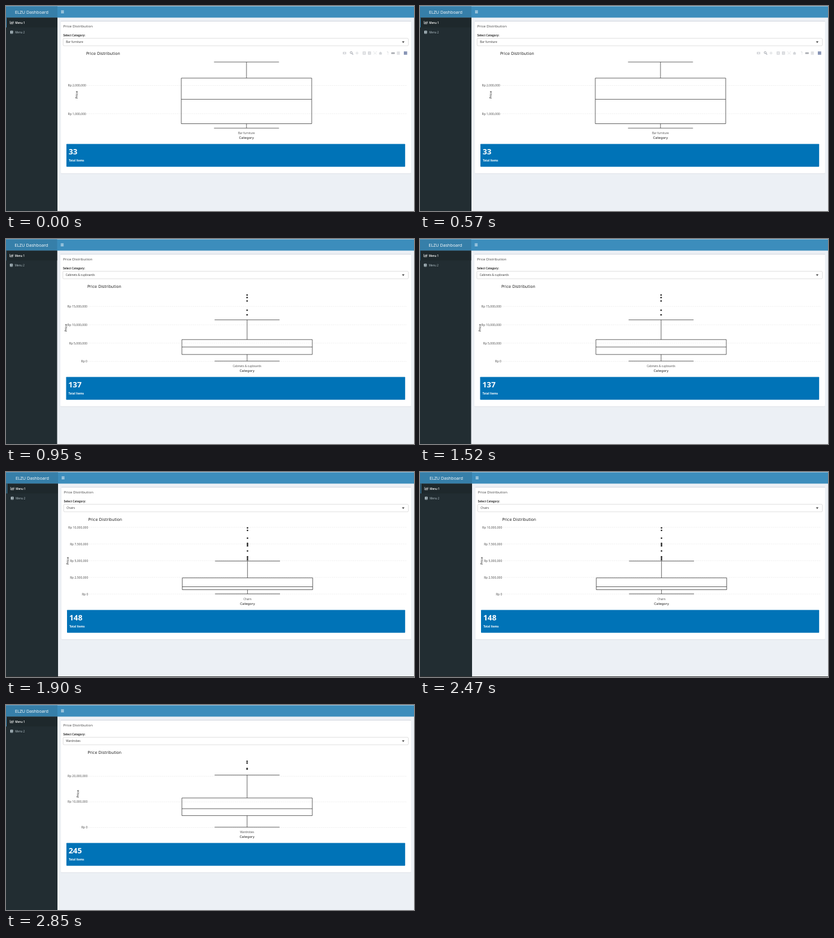
Animation of 682x344 px, one loop 3800 ms. Source, as an HTML page:

```html
<!DOCTYPE html>
<html lang="en">
<head>
<meta charset="utf-8">
<title>Dashboard</title>
<style>
  html, body { margin: 0; width: 100%; height: 100%; overflow: hidden; background: #ecf0f5; }
  svg { display: block; font-family: "Open Sans", "Noto Sans", sans-serif; }
  .plot { font-family: "DejaVu Sans", sans-serif; fill: #222; }
</style>
</head>
<body>
<svg id="stage" width="682" height="344" viewBox="0 0 682 344"></svg>
<script>
const HOLD = 950;

// dx: shell offset; ticks: [label, y]; box: [upper, q3, median, q1, lower]
const scenes = [
  { name: "Bar furniture", total: 33, dx: 0, titleX: 134, priceX: 119.5, cx: 402, tools: true,
    ticks: [["2,000,000", 133.5], ["1,000,000", 180.7]],
    box: [94, 121, 156.6, 197.5, 205], dots: [] },
  { name: "Cabinets & cupboards", total: 137, dx: -.5, titleX: 136, priceX: 102, cx: 403,
    ticks: [["15,000,000", 113.2], ["10,000,000", 144], ["5,000,000", 174.7], ["0", 205.4]],
    box: [135.7, 168.8, 181.2, 193.8, 204.9], dots: [94, 98.3, 104, 119.5, 127.3] },
  { name: "Chairs", total: 148, dx: 1, titleX: 137.4, priceX: 105.3, cx: 403.7, footer: true,
    ticks: [["10,000,000", 92.8], ["7,500,000", 120.8], ["5,000,000", 148.8], ["2,500,000", 176.8], ["0", 204.8]],
    box: [149.4, 177.7, 192.5, 197.5, 204.6],
    dots: [93.7, 98, 111, 119.7, 121.8, 124, 132.5, 142.4, 144.8, 147.2] },
  { name: "Wardrobes", total: 245, dx: 0, titleX: 136.4, priceX: 122, cx: 403,
    ticks: [["20,000,000", 119.5], ["10,000,000", 162.6], ["0", 205.6]],
    box: [117.6, 156, 174, 185.6, 205], dots: [94.5, 97.5, 106.6, 107.6] }
];

const rect = (x, y, w, h, fill, extra = "") =>
  `<rect x="${x}" y="${y}" width="${w}" height="${h}" fill="${fill}" ${extra}/>`;
const path = (d, stroke, width, extra = "") =>
  `<path d="${d}" fill="none" stroke="${stroke}" stroke-width="${width}" ${extra}/>`;
const text = (s, x, y, size, fill, extra = "") =>
  `<text x="${x}" y="${y}" font-size="${size}" fill="${fill}" ${extra}>${String(s).replace("&", "&amp;")}</text>`;
const BOLD = 'font-weight="700"', SEMI = 'font-weight="600"';
const MID = 'text-anchor="middle"', END = 'text-anchor="end"';

function shell({ dx, footer }) {
  const side = 86 + dx;
  return rect(0, 0, 682, 344, "#ecf0f5")
    + rect(0, .5, 682, 19, "#3c8dbc")
    + rect(0, 19.5, side, 325, "#222d32")
    + rect(0, .5, side, 19, "#367fa9")
    + rect(0, 19.5, side, 16.5, "#1e282c")
    + (footer ? rect(0, 343, 682, 1, "#333") : "")
    + `<g transform="translate(${dx})">`
    + rect(0, 19.5, 1, 16.5, "#3c8dbc")
    + text("ELZU Dashboard", 43, 12.6, 7.2, "#fff", MID)
    + path("M92 8h4.8m-4.8 1.8h4.8m-4.8 1.8h4.8", "#fff", .8)
    + path("M6.9 25.2v4.7h5.3M8.5 29v-1.8m1.3 1.8v-3m1.3 3v-2.3m1.1 2.3v-3.4", "#fff", .65)
    + text("Menu 1", 15.2, 29.6, 4.6, "#fff", SEMI)
    + rect(7.1, 41.5, 4.7, 5, "#b8c7ce", 'rx=".7"')
    + path("M8.6 42.8h2.3m-2.3 1h2.3M8 45.5h3.6", "#222d32", .45)
    + text("Menu 2", 15.2, 46, 4.6, "#b8c7ce")
    + "</g>";
}

function card({ dx, name, total }) {
  const left = 91.5 + dx;
  return rect(left, 25.6, 677 - left, 256, "#d9dde2", 'rx="1.5"')
    + rect(left, 25.5, 677 - left, 255.3, "#fff", 'rx="1.5"')
    + rect(left, 25, 677 - left, 1, "#d2d6de", 'rx=".5"')
    + text("Price Distribution", 95.7 + dx, 35.8, 6.1, "#444")
    + text("Select Category:", 95.7 + dx, 50.5, 4.6, "#333", BOLD)
    + rect(95.5 + dx, 54.2, 577 - dx, 12.6, "#fff", 'rx="1.5" stroke="#ccc" stroke-width=".6"')
    + text(name, 100.3 + dx, 62.4, 4.75, "#333")
    + '<path d="M661.8 59.4h4.4l-2.2 2.4z" fill="#222"/>'
    + rect(101 + dx, 231.6, 566.2 - dx, 38.1, "#0073b7", 'rx=".7"')
    + text(total, 104.7 + dx, 248.5, 12.9, "#fff", BOLD)
    + text("Total Items", 104.9 + dx, 260.9, 4.6, "#fff", BOLD);
}

function modebar() {
  const gray = "#d4d6da";
  return rect(563, 77, 5.6, 4, gray, 'rx=".6"') + `<circle cx="565.8" cy="79" r="1.1" fill="#fff"/>`
    + `<circle cx="577" cy="78.2" r="1.7" fill="none" stroke="#a5a9b0"/>` + path("M578.3 79.5l2 2", "#a5a9b0", 1.1)
    + path("M584.2 79h5.2m-2.6-2.6v5.2", gray, .9)
    + rect(596.2, 76.4, 5.2, 5.2, gray) + path("M597.3 79h3m-1.5-1.5v3", "#fff", .8)
    + rect(605, 76.4, 5.2, 5.2, gray) + path("M606.1 79h3", "#fff", .8)
    + path("M614.4 76.5l5 5m0-5l-5 5", gray, .9, 'stroke-dasharray="2.5 1.5"')
    + `<path d="M623 79.2l3-2.8 3 2.8h-.8v2.4h-4.4v-2.4z" fill="${gray}"/>`
    + path("M636.6 76.8h2v2.6m0 1v1", gray, .8)
    + rect(644, 77.7, 5.8, 2.7, "#a9acb2", 'rx=".5"')
    + rect(653.4, 76.6, 5, 2, gray) + rect(653.4, 79.4, 5, 2, gray)
    + rect(665, 76.2, 5.6, 5.6, "#8794b5");
}

function chart({ name, titleX, priceX, cx, ticks, box, dots, tools }) {
  const [top, q3, median, q1, bottom] = box;
  const boxL = cx - 109, capL = cx - 54.3;
  const grid = ticks.map(([label, y]) =>
    path(`M${titleX + 1} ${y}H670`, "#ececec", .7, 'stroke-dasharray="2.5 1"')
    + text("Rp " + label, titleX, y + 1.8, 5.1, "#4a4a4a", END)).join("");
  return grid
    + text("Price Distribution", titleX, 81.7, 6.6, "", 'class="plot"')
    + text("Price", 0, 0, 5.3, "", `class="plot" ${MID} transform="translate(${priceX} 149) rotate(-90)"`)
    + path(`M${capL} ${top}h108.6M${capL} ${bottom}h108.6M${cx} ${top}V${q3}M${cx} ${q1}V${bottom}`
      + `M${boxL} ${q3}h218V${q1}h-218zM${boxL} ${median}h218`, "#333", .75)
    + dots.map(y => `<circle cx="${cx}" cy="${y}" r="1.3" fill="#222"/>`).join("")
    + text(name, cx, 215, 4.65, "#4a4a4a", MID)
    + text("Category", cx, 223.2, 5.45, "", `class="plot" ${MID}`)
    + (tools ? modebar() : "");
}

const stage = document.getElementById("stage");
const start = performance.now();
let shown = -1;

function tick() {
  const index = Math.floor((performance.now() - start) / HOLD) % scenes.length;
  if (index !== shown) {
    const scene = scenes[shown = index];
    // The grid lies behind the box, so its interior is filled by the card's white.
    stage.innerHTML = shell(scene) + card(scene) + chart(scene);
  }
  requestAnimationFrame(tick);
}
tick();
</script>
</body>
</html>
```
